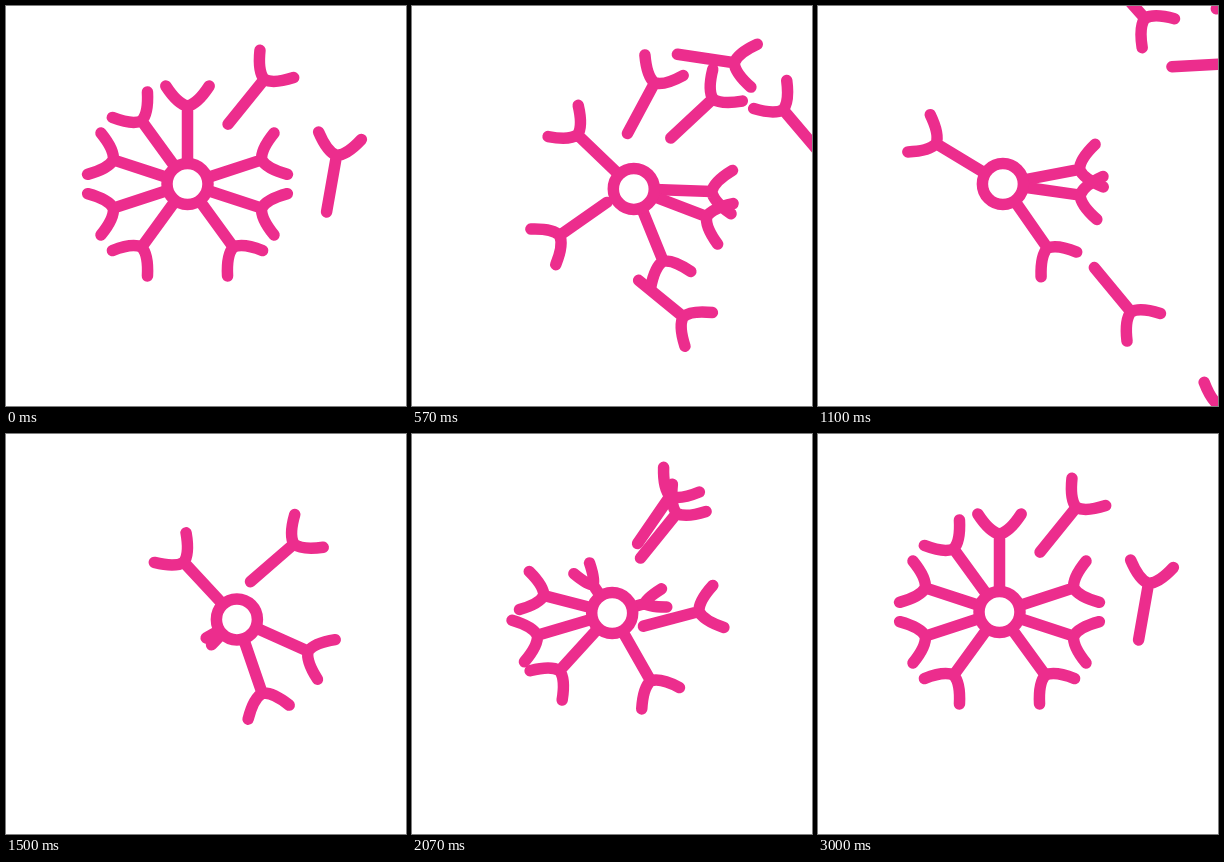
An HTML page with a canvas for the animation above (3.02 s loop, 400x400 px).

```html
<!DOCTYPE html>
<html lang="en">
<head>
<meta charset="utf-8">
<title>Dandelion in the wind</title>
<style>
  html, body { margin: 0; width: 100%; height: 100%; overflow: hidden; background: #fff; }
  canvas { display: block; width: 400px; height: 400px; }
</style>
</head>
<body>
<canvas id="stage"></canvas>
<script>
const PINK = '#ec2d8d';
const LOOP = 3020, CYCLE = 3000, STEP = 25;
const HUB_R = 20.5, STALK = 168, REACH = 78, MID = 49;
const FIRST_BUD = -1570, BUD_GAP = 164, GROW = 350, SETTLE = 640, GUST = 350;

const canvas = document.getElementById('stage');
const ctx = canvas.getContext('2d');
const ratio = window.devicePixelRatio || 1;
canvas.width = canvas.height = 400 * ratio;
ctx.scale(ratio, ratio);

const rad = deg => deg * Math.PI / 180;
const clamp = u => Math.min(1, Math.max(0, u));
const along = ([x, y], deg, r) => [x + r * Math.sin(rad(deg)), y - r * Math.cos(rad(deg))];

// Smooth curve through keys [time, ...values], running on straight past the last.
function curve(keys, t, c) {
  const last = keys.length - 1;
  const slope = k => {
    const p = keys[Math.max(k - 1, 0)], n = keys[Math.min(k + 1, last)];
    return (n[c] - p[c]) / (n[0] - p[0]);
  };
  if (t >= keys[last][0]) return keys[last][c] + slope(last) * (t - keys[last][0]);
  let i = 0;
  while (t >= keys[i + 1][0]) i++;
  const a = keys[i], b = keys[i + 1], h = b[0] - a[0], u = (t - a[0]) / h;
  const u2 = u * u, u3 = u2 * u;
  return (2 * u3 - 3 * u2 + 1) * a[c] + (u3 - 2 * u2 + u) * h * slope(i)
       + (3 * u2 - 2 * u3) * b[c] + (u3 - u2) * h * slope(i + 1);
}

// The head leans on an unseen stalk: [time, degrees].
const sway = [[0, 0], [350, 12.9], [770, 11.7], [1085, 1], [1500, 17.1], [2070, 6.5], [2400, -2.9]];
const swayLoop = [-1, 0, 1].flatMap(n => sway.map(([t, deg]) => [t + n * CYCLE, deg]));
const leanAt = t => curve(swayLoop, (t + CYCLE) % CYCLE, 1);
const hubAt = t => along([181.5, 178 + STALK], leanAt(t), STALK);

// Ages count from the gust: seeds bud before it and are bent back by it.
function heldAngle(s, age) {
  const young = clamp((age - s.born) / SETTLE);
  const gust = (1 - Math.cos(Math.PI * clamp(age / GUST))) / 2;
  return s.slot + leanAt(age) - 10 * Math.sin(Math.PI * young) ** 2 - s.bend * gust;
}

// flight: [age, x, y, angle] of the middle of the stem.
function seed(slot, bend, order, loose, flight) {
  const s = { slot, bend, born: FIRST_BUD + BUD_GAP * order, loose };
  const angle = heldAngle(s, loose);
  s.flight = [[loose, ...along(hubAt(loose), angle, MID), angle], ...flight];
  return s;
}

const seeds = [
  seed(0, 22, 4, 400, [[770, 246, 67, 69]]),
  seed(72, 30, 3, 150, [[350, 251.5, 130, 35], [770, 306.5, 99.5, 64]]),
  seed(108, 30, 4, 1350, [[1500, 266, 129, 49], [2070, 246.5, 102, 39], [3000, 240, 96, 39],
    [3350, 252, 80.5, 59], [3770, 336.5, 24.5, 138]]),
  seed(252, 72, 1, 300, [[350, 201, 229, 180], [770, 292.5, 350, 86]]),
  seed(288, 54, 2, 360, [[770, 187, 229, 215], [1300, 370, 320, 90]]),
  seed(324, 24, 3, 1750, [[2070, 240.5, 87, 36], [2400, 343, 20.5, 114]])
];
// The lower left seed is bent round into the lower right slot, then flies a cycle later.
const turning = { ...seed(216, 72, 0, CYCLE, []), until: CYCLE };
const turned = { ...seed(144, 47, 0, 1930, [[2070, 258.5, 185, 76], [2400, 300, 187, 36],
  [3000, 325.5, 178, 10], [3350, 350.5, 165.5, -7], [3770, 429, 85, -74]]), born: -CYCLE, from: 0 };
seeds.push(turning, turned);

function drawSeed(s, age) {
  let root = hubAt(age), angle;
  if (age < s.loose) {
    angle = heldAngle(s, age);
  } else {
    const [x, y, a] = [1, 2, 3].map(c => curve(s.flight, age, c));
    const away = Math.max(0, age - s.flight[s.flight.length - 1][0]);
    const push = 0.0003 * away * away;
    angle = a;
    root = along([x + push, y - push / 2], angle, -MID);
  }
  const size = clamp((age - s.born) / GROW);
  const fork = -REACH * size;
  ctx.save();
  ctx.translate(...root);
  ctx.rotate(rad(angle));
  ctx.beginPath();
  ctx.moveTo(0, Math.max(-HUB_R, fork));
  ctx.lineTo(0, fork);
  for (const side of [-size, size]) {
    ctx.moveTo(0, fork);
    ctx.quadraticCurveTo(side * 10, fork - 2, side * 21.7, fork - 20);
  }
  ctx.stroke();
  ctx.restore();
}

function draw(t) {
  ctx.fillStyle = '#fff';
  ctx.fillRect(0, 0, 400, 400);
  ctx.strokeStyle = PINK;
  ctx.lineCap = ctx.lineJoin = 'round';
  ctx.lineWidth = 11.5;
  for (const s of seeds) {
    const { from = s.born, until = Infinity } = s;
    for (const age of [t - CYCLE, t, t + CYCLE]) {
      if (age >= from && age < until) drawSeed(s, age);
    }
  }
  ctx.beginPath();
  ctx.arc(...hubAt(t), HUB_R, 0, 2 * Math.PI);
  ctx.fill();
  ctx.stroke();
}

const begin = performance.now();
function tick(now) {
  const t = Math.max(0, now - begin) % LOOP;
  draw(Math.floor((t + 5) / STEP) * STEP);
  requestAnimationFrame(tick);
}
draw(0);
requestAnimationFrame(tick);
</script>
</body>
</html>
```
